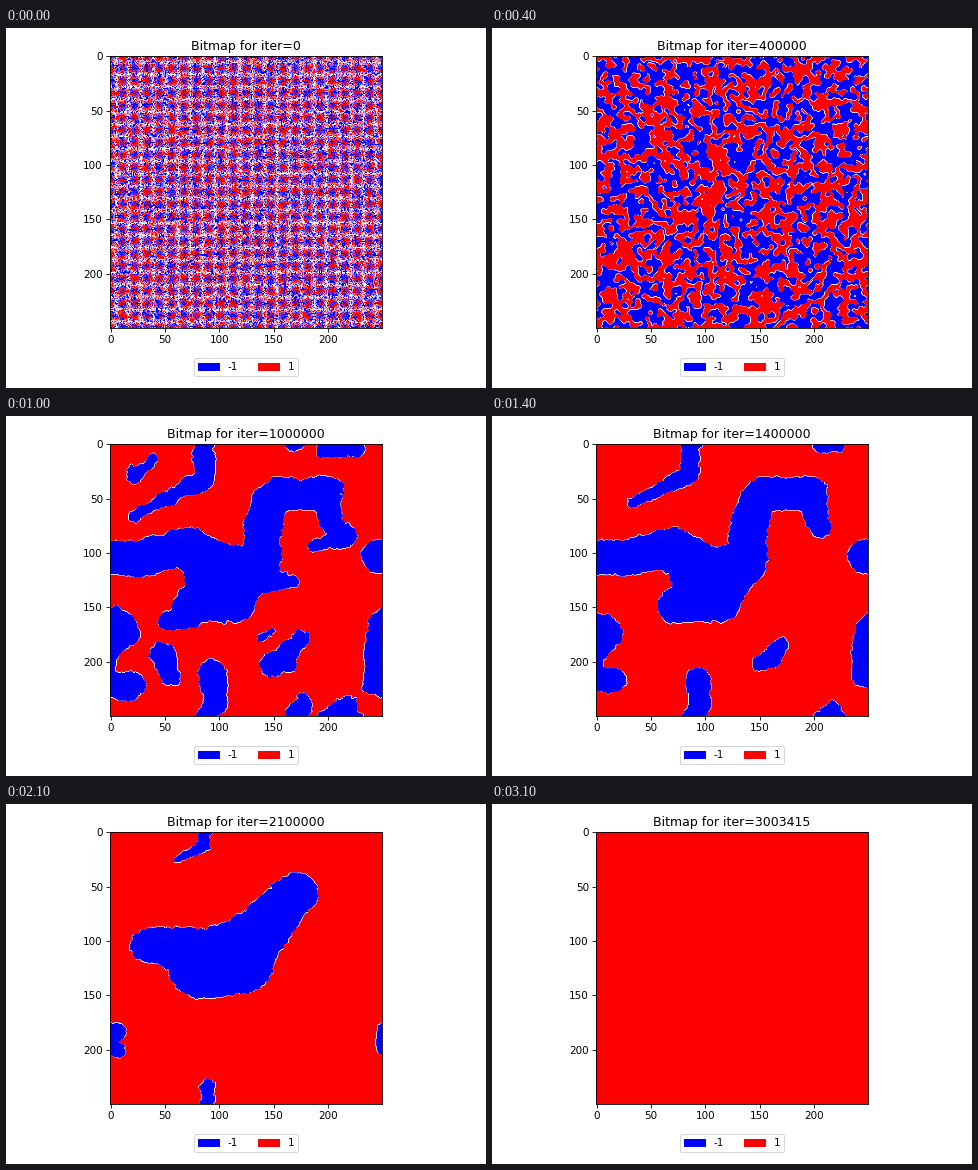
A matplotlib script for the animation above (3.2 s loop, 480 by 360 pixels).

```python
import numpy as np
import matplotlib.pyplot as plt
from matplotlib.animation import FuncAnimation
from matplotlib.patches import Patch
from matplotlib.transforms import IdentityTransform

N = 250
FRAMES = 32
STEP = 100000
LAST_ITER = 3003415
W, H = 480, 360
LEFT, TOP, SIDE = 104.2, 27.95, 271.6      # axes box in pixels

FORMED = 10                # frame at which clear domains have formed
BEND, BENT = 14, 21        # the large domain straightens in between
END = LAST_ITER / STEP

# Domains are chains of discs (x, y, radius) on the periodic lattice.
SNAKE = np.array([(-3, 103, 16), (25, 104, 16), (70, 95, 19), (105, 127, 31),
                  (137, 108, 20), (140, 72, 17), (152, 46, 16), (197, 45, 15),
                  (205, 76, 10)], float)
BOOT = np.array([(33, 104, 15), (45, 103, 17), (72, 111, 24), (85, 121, 32),
                 (115, 115, 34), (143, 86, 24), (165, 60, 20), (171, 56, 19),
                 (172, 56, 19)], float)
HEEL = np.array([(72, 148, 16), (110, 140, 24)], float)
HEEL_BENT = np.array([(85, 122, 30), (122, 119, 28)], float)

# Smaller domains, each with the frame at which it vanishes.
SMALL = [
    (23, [(95, 210, 13), (97, 240, 11), (87, 250, 9), (85, 283, 10),
          (62, 295, 8), (22, 315, 5)]),
    (22.2, [(5, 170, 21), (-6, 195, 14), (-8, 218, 11), (18, 222, 13)]),
    (18, [(145, 205, 8), (160, 198, 12), (175, 178, 8)]),
    (17, [(220, 240, 9), (200, 253, 8), (227, 253, 8)]),
    (13, [(22, 28, 7), (38, 13, 5)]),
    (13, [(50, 193, 10), (56, 213, 9)]),
    (13, [(176, 238, 9), (167, 246, 8)]),
    (13, [(185, 96, 3), (212, 85, 11)]),
    (13, [(145, 125, 10), (168, 128, 5)]),
    (12, [(52, 162, 8), (80, 158, 8)]),
    (12, [(138, 177, 4), (147, 171, 4)]),
]

X, Y = np.meshgrid(np.arange(N), np.arange(N))
FREQ = np.fft.fftfreq(N)
FREQ2 = FREQ[:, None] ** 2 + FREQ[None, :] ** 2
rng = np.random.default_rng(7)


def blur(grid, sigma):
    """Periodic Gaussian blur."""
    kernel = np.exp(-2 * np.pi ** 2 * sigma ** 2 * FREQ2)
    return np.fft.ifft2(np.fft.fft2(grid) * kernel).real


def smooth_noise(sigma):
    out = blur(rng.standard_normal((N, N)), sigma)
    return out / out.std()


def wrap(d):
    return (d + N / 2) % N - N / 2


def capsule(a, b):
    """Signed depth inside the tapered stroke between two discs."""
    mx, my = (a[0] + b[0]) / 2, (a[1] + b[1]) / 2
    px, py = wrap(X - mx) + mx - a[0], wrap(Y - my) + my - a[1]
    dx, dy = b[0] - a[0], b[1] - a[1]
    u = np.clip((px * dx + py * dy) / (dx * dx + dy * dy + 1e-9), 0, 1)
    return a[2] + u * (b[2] - a[2]) - np.hypot(px - u * dx, py - u * dy)


def shrink(chain, born, die, k):
    """Draw a chain in to its centre, area falling about linearly."""
    g = np.sqrt(np.clip((die - k) / (die - born), 0, 1))
    xy, r = chain[:, :2], chain[:, 2:]
    centre = (xy * r ** 2).sum(axis=0) / (r ** 2).sum()
    return np.hstack([centre + (xy - centre) * g, r * g ** 0.6])


def chains(k):
    u = np.clip((k - BEND) / (BENT - BEND), 0, 1)
    body = np.vstack([SNAKE + u * (BOOT - SNAKE), HEEL + u * (HEEL_BENT - HEEL)])
    body = shrink(body, BENT, END, k)
    yield body[:len(SNAKE)]
    yield body[len(SNAKE):]
    for die, discs in SMALL:
        if k < die:
            yield shrink(np.array(discs, float), FORMED, die, k)


def blue_depth(k):
    """Positive inside the blue domains."""
    depth = np.full((N, N), -99.0)
    for chain in chains(k):
        for a, b in zip(chain, chain[1:]):
            depth = np.maximum(depth, capsule(a, b))
    wobble = 1.5 * np.exp((FORMED - k) / 3) * bumps
    return blur(depth, 1.5) + 0.6 * rough + wobble


def sweep(spin, bias):
    """Let random sites join the majority of their eight neighbours."""
    for _ in range(8):
        rows = np.roll(spin, 1, 0) + spin + np.roll(spin, -1, 0)
        near = np.roll(rows, 1, 1) + rows + np.roll(rows, -1, 1) - spin
        force = near / 8 + bias
        chosen = (rng.random((N, N)) < 0.2) & (force != 0)
        spin = np.where(chosen, np.sign(force), spin)
    return spin


def run():
    spin = rng.choice([-1.0, 1.0], (N, N))
    pull = -np.clip(blue_depth(FORMED) / 6, -1, 1)
    for k in range(FRAMES):
        if k >= END:
            spin = np.ones((N, N))
        elif k >= FORMED:
            spin = np.where(blue_depth(k) > 0, -1.0, 1.0)
        elif k > 0:
            spin = sweep(spin, 0.15 * max(k - 5, 0) * pull)
        yield spin


rough, bumps = smooth_noise(1.1), smooth_noise(5)
spins = list(run())

fig = plt.figure(figsize=(W / 75, H / 75), dpi=75)
ax = fig.add_axes([LEFT / W, 1 - (TOP + SIDE) / H, SIDE / W, SIDE / H])
img = ax.imshow(spins[0], cmap="bwr", vmin=-1, vmax=1, aspect="auto")
ax.set_xticks(range(0, N, 50))
ax.set_yticks(range(0, N, 50))
title = ax.set_title("")
ax.legend(handles=[Patch(color="blue", label="-1"), Patch(color="red", label="1")],
          loc="center", ncol=2, borderaxespad=0,
          bbox_to_anchor=(W / 2, 20.8), bbox_transform=IdentityTransform())


def draw(k):
    img.set_data(spins[k])
    title.set_text(f"Bitmap for iter={min(k * STEP, LAST_ITER)}")
    return img, title


anim = FuncAnimation(fig, draw, frames=FRAMES, interval=100,
                     init_func=lambda: draw(0), repeat=True, repeat_delay=0)
plt.show()
```
